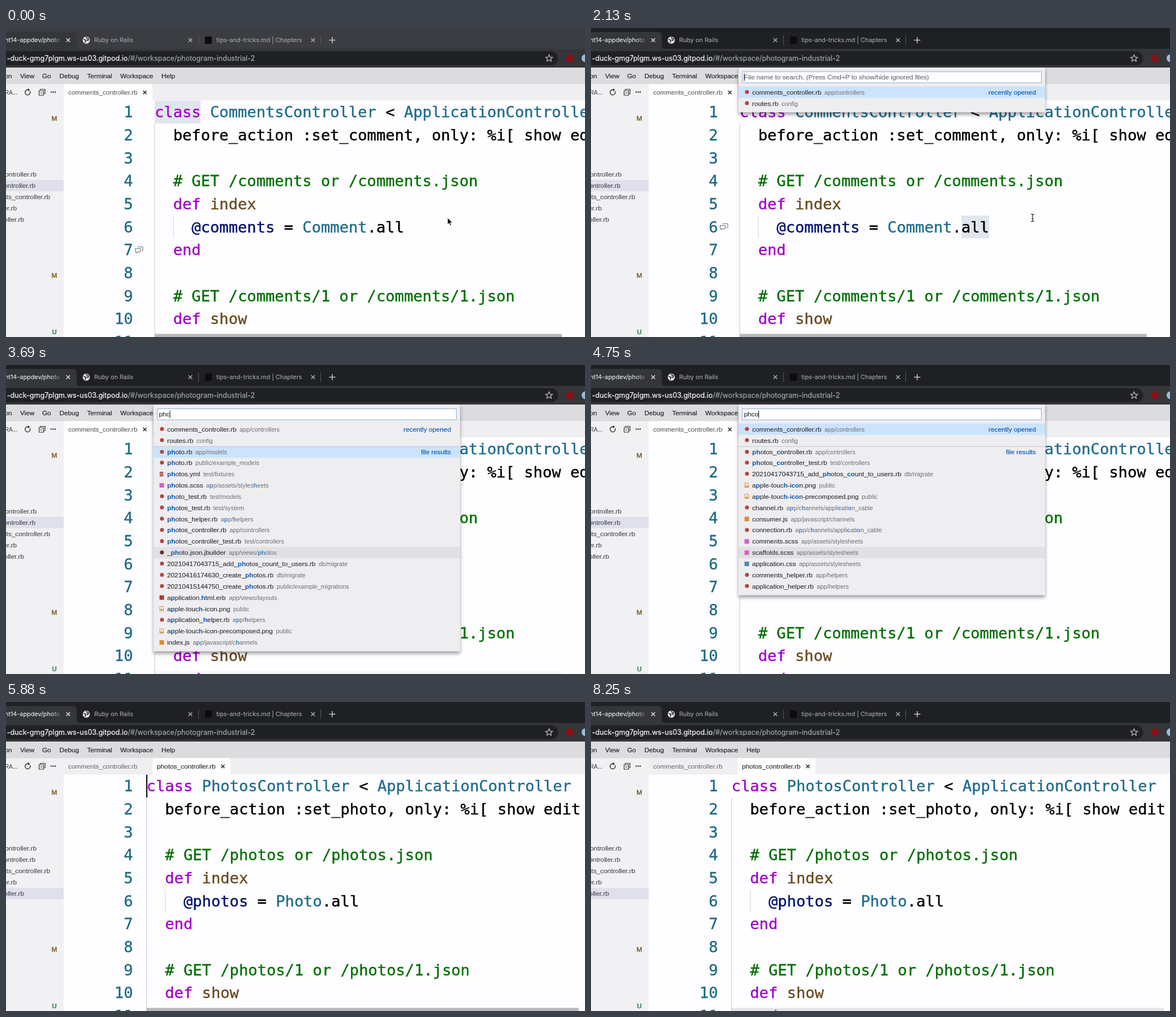
Recreate the animation shown at these times as an HTML page. Size 1024 by 547 pixels, loop 8.31 s.

```html
<!DOCTYPE html>
<html lang="en">
<head>
<meta charset="utf-8">
<title>Quick file open</title>
<style>
html, body { margin: 0; width: 100%; height: 100%; overflow: hidden; background: #fefdff; }
svg { display: block; width: 1024px; height: 547px; }
text { white-space: pre; stroke-width: .15px; }
.ui { font: 11.8px "Liberation Sans", Arial, sans-serif; }
.chrome { font: 10.85px Inter, sans-serif; }
.url { font: 12.55px Inter, sans-serif; stroke-width: .25px; }
.code { font: 27.13px "DejaVu Sans Mono", monospace; stroke-width: .4px; }
.hit { font-weight: bold; fill: #0a55ac; stroke: none; }
.desc { font-size: 10.8px; fill: #6e6e72; stroke: none; }
.desc .hit { fill: #4580c2; }
.pop { filter: drop-shadow(0 4px 3.4px rgba(0, 0, 0, .38)); }
</style>
</head>
<body>
<svg id="stage" viewBox="0 0 1024 547"></svg>
<script>
const LOOP = 8310;
const CLICK = 600, OPEN = 1700, CLOSE = 5350, LOAD = 5700;
const TYPED = [[OPEN, ''], [2720, 'p'], [2930, 'ph'], [3520, 'phc'], [3700, 'phco']];
const DOWN = [4880, 5060];
const LINE = 40.67, ROW = 19.87;
const INK = { k: '#a000cb', c: '#1f6c8c', t: '#000', g: '#007000', f: '#664b20', v: '#001070' };
const stage = document.getElementById('stage');

function el(parent, tag, attrs = {}, content) {
  const node = document.createElementNS('http://www.w3.org/2000/svg', tag);
  for (const key in attrs) node.setAttribute(key, attrs[key]);
  if (content !== undefined) node.textContent = content;
  parent.append(node);
  return node;
}
const group = (parent = stage) => el(parent, 'g');
const rect = (p, x, y, width, height, fill, more) => el(p, 'rect', { x, y, width, height, fill, ...more });
const path = (p, d, stroke, width = 1, more) =>
  el(p, 'path', { d, stroke, 'stroke-width': width, fill: 'none', ...more });
const circle = (p, cx, cy, r, fill) => el(p, 'circle', { cx, cy, r, fill });
const text = (p, x, y, str, fill, cls = 'ui', more) =>
  el(p, 'text', { x, y, fill, stroke: fill, class: cls, ...more }, str);
const END = { 'text-anchor': 'end' };
const cross = (p, x, y, r, color, w) =>
  path(p, `M${x - r} ${y - r}l${2 * r} ${2 * r}m0 ${-2 * r}l${-2 * r} ${2 * r}`, color, w);
const show = (node, on) => node.setAttribute('display', on ? 'inline' : 'none');

// Editor
rect(stage, 0, 0, 1024, 547, '#fefdff');
for (let i = 0; i < 11; i++) text(stage, 224.5, 158.4 + i * LINE, i + 1, '#1f6b85', 'code', END);

function listing(x, name) {
  const g = group(), many = name.toLowerCase() + 's';
  const marks = group(g);
  path(g, `M${x} 169V547`, '#c9c9cd');
  path(g, `M${x + 33} 332V372`, '#d3d3d6');
  [
    `kclass ~c${name}sController~t < ~cApplicationController`,
    `t  before_action :set_${name.toLowerCase()}, only: %i[ show edit update destroy ]`,
    '',
    `g  # GET /${many} or /${many}.json`,
    'k  def ~findex',
    `v    @${many}~t = ~c${name}~t.all`,
    'k  end',
    '',
    `g  # GET /${many}/1 or /${many}/1.json`,
    'k  def ~fshow',
    'k  end'
  ].forEach((line, i) => {
    const row = text(g, x, 158.4 + i * LINE, '', INK.t, 'code');
    if (line) line.split('~').forEach(s => el(row, 'tspan', { fill: INK[s[0]], stroke: INK[s[0]] }, s.slice(1)));
  });
  return { g, marks };
}
const comments = listing(263, 'Comment');
const photos = listing(248.6, 'Photo');
const wordClass = rect(comments.marks, 263, 128.5, 81, 40.5, '#e0e6ef');
const wordAll = rect(comments.marks, 655, 332, 49, 40.5, '#e0e6ef');
const lineCaret = rect(comments.g, 703, 332, 2, 40, '#000');
const fileCaret = rect(photos.g, 248, 128.5, 2, 40.5, '#000');

const bubble = group();
path(bubble, 'M232.5 -5.5h9.5v6.5h-2.5M228.5 -2.5h9v6h-4.5l-2 2.5v-2.5h-2.5z', '#6c6c70', 1, { fill: '#fefdff' });
const slider = rect(stage, 263, 541.5, 720, 5.5, '#b9b9bb');

// Side panel
rect(stage, 0, 99, 102, 448, '#f1f0f3');
const picked = rect(stage, 0, 269, 102, 20, '#e0e0ec');
[['application', 54], ['comments', 52], ['follow_requests', 78], ['likes', 19], ['photos', 32]]
  .forEach(([name, x], i) => text(stage, x, 263 + i * 20, name + '_controller.rb', '#4a4a4e', 'ui', END));
text(stage, 20, 118, 'PHOTOGRA...', '#4e4e52', 'ui', { ...END, style: 'font-size:10px' });
[['M', 164, '#704c10'], ['M', 442, '#704c10'], ['U', 542, '#14702a']]
  .forEach(([s, y, c]) => text(stage, 85.5, y, s, c, 'ui', { 'text-anchor': 'middle', style: 'stroke-width:.35px' }));
path(stage, 'M42.6 112a4.6 4.6 0 1 1-3.2-2.6', '#333', 1.5);
path(stage, 'M38.5 107l4 2.2-3.5 3z', 'none', 0, { fill: '#333' });
path(stage, 'M60.5 110v-1.5h8.5v8h-1.5M58.5 111h8v8h-8zM60.5 115h4', '#333', 1.2);
for (const x of [80, 83.5, 87]) circle(stage, x, 113.5, 1.2, '#333');

// Menu and file tabs
rect(stage, 0, 70, 1024, 29.5, '#dcdbde');
rect(stage, 102, 99.5, 922, 28.5, '#efeef1');
[['Selection', 10.5, END], ['View', 25], ['Go', 64], ['Debug', 94.5], ['Terminal', 143.5], ['Workspace', 202], ['Help', 275]]
  .forEach(([s, x, more]) => text(stage, x, 88.7, s, '#1f1f21', 'ui', { style: 'font-size:11.7px', ...more }));

function fileTab(x, width, name, lit) {
  const g = group();
  rect(g, x, 99.5, width, 29, lit ? '#fefdff' : '#efeef1');
  text(g, x + 8, 118, name, lit || '#747477');
  if (lit) cross(g, x + width - 13.5, 114, 3, '#222', 1.5);
  return g;
}
const before = fileTab(102, 157, 'comments_controller.rb', '#606064');
const after = group();
after.append(fileTab(102, 157, 'comments_controller.rb'), fileTab(259, 138, 'photos_controller.rb', '#2a2a2c'));

// Browser frame
const strip = rect(stage, 0, 0, 1024, 38, '#1f2024');
rect(stage, 0, 37, 1024, 33, '#35363a');
path(stage, 'M0 7H118Q125 7 125 14V31Q125 37 131 37H0Z', 'none', 0, { fill: '#35363a' });
const fade = el(el(stage, 'defs'), 'linearGradient', { id: 'fade', gradientUnits: 'userSpaceOnUse', x1: 78, x2: 98 });
el(fade, 'stop', { offset: 0, 'stop-color': '#e4e5e8' });
el(fade, 'stop', { offset: 1, 'stop-color': '#e4e5e8', 'stop-opacity': 0.1 });
text(stage, -2, 25.2, 'nt14-appdev/photo', 'url(#fade)', 'chrome');
text(stage, 156, 25.2, 'Ruby on Rails', '#a0a3a8', 'chrome');
text(stage, 372, 25.2, 'tips-and-tricks.md | Chapters', '#a0a3a8', 'chrome');
cross(stage, 110, 21.5, 3.3, '#e0e1e4', 1.4);
cross(stage, 326, 21.5, 3.3, '#b0b2b6', 1.4);
cross(stage, 543, 21.5, 3.3, '#b0b2b6', 1.4);
path(stage, 'M571.5 21.5h11M577 16v11', '#c4c6c9', 1.5);
path(stage, 'M340.5 13v17M556.5 13v17', '#55575b');
circle(stage, 142, 21.5, 6.3, '#e6e7e9');
path(stage, 'M137 20l3 1 1 2-1 3M142 16l1 2 3 1-1 3-3-1', '#303135', 1.8);
rect(stage, 352, 15, 12, 13, '#0c0c0e');
path(stage, 'M0 41H964a12.5 12.5 0 0 1 0 25H0Z', 'none', 0, { fill: '#202124' });
text(stage, 215.3, 58, '-duck-gmg7plgm.ws-us03.gitpod.io', '#f0f1f4', 'url', END);
text(stage, 215.6, 58, '/#/workspace/photogram-industrial-2', '#9aa0a6', 'url');
path(stage, 'M960.5 47.5l1.8 4 4.2.4-3.2 2.8 1 4.2-3.8-2.3-3.8 2.3 1-4.2-3.2-2.8 4.2-.4z', '#c6c8cb', 1.2);
circle(stage, 997, 53.5, 6.8, '#8c0f16');
circle(stage, 1025, 53.5, 7, '#9bbbdc');

// Quick open palette: kind|name|folder, brackets mark matched letters
const RECENT = ['r|comments_controller.rb|app/controllers', 'r|routes.rb|config'];
const FOUND_PH = [
  'r|[ph]oto.rb|app/models', 'r|[ph]oto.rb|public/example_models', 'y|[ph]otos.yml|test/fixtures',
  's|[ph]otos.scss|a[p]p/assets/styles[h]eets', 'r|[ph]oto_test.rb|test/models', 'r|[ph]otos_test.rb|test/system',
  'r|[ph]otos_helper.rb|a[p]p/[h]elpers', 'r|[ph]otos_controller.rb|app/controllers',
  'r|[ph]otos_controller_test.rb|test/controllers', 'd|_[ph]oto.json.jbuilder|app/views/[ph]otos',
  'r|20210417043715_add_[ph]otos_count_to_users.rb|db/migrate', 'r|20210416174630_create_[ph]otos.rb|db/migrate',
  'r|20210415144750_create_[ph]otos.rb|public/example_migrations', 'h|a[p]plication.[h]tml.erb|app/views/layouts',
  'i|a[p]ple-touc[h]-icon.png|public', 'r|a[p]plication_[h]elper.rb|a[p]p/[h]elpers',
  'i|a[p]ple-touc[h]-icon-precomposed.png|public', 'j|index.js|a[p]p/javascript/c[h]annels'
];
const FOUND_PHCO = [
  'r|[ph]otos_[co]ntroller.rb|app/controllers', 'r|[ph]otos_[co]ntroller_test.rb|test/controllers',
  'r|20210417043715_add_[ph]otos_[co]unt_to_users.rb|db/migrate', 'i|a[p]ple-touc[h]-i[co]n.png|public',
  'i|a[p]ple-touc[h]-i[co]n-precomposed.png|public', 'r|channel.rb|a[p]p/c[h]annels/appli[c]ati[o]n_cable',
  'j|consumer.js|app/javascript/channels', 'r|connection.rb|a[p]p/c[h]annels/appli[c]ati[o]n_cable',
  's|comments.scss|app/assets/stylesheets', 's|scaffolds.scss|app/assets/stylesheets',
  'c|application.css|app/assets/stylesheets', 'r|comments_helper.rb|app/helpers', 'r|application_helper.rb|app/helpers'
];

function icon(p, kind, y) {
  const square = { h: '#b03a30', c: '#4b89ad', j: '#dd8a2c', s: '#d95fc4' }[kind];
  if (square) rect(p, 271.5, y - 4, 8, 8, square);
  else if (kind === 'i') {
    path(p, `M272 ${y - 4}h6.5v7.5h-6.5z`, '#d99545');
    path(p, `M272.5 ${y + 3}l2-3.5 2 2 1-1 1 2.5z`, 'none', 0, { fill: '#d99545' });
  } else if (kind === 'y') {
    for (const dy of [-4, -1, 2]) rect(p, 271.5, y + dy, 7, 2.2, '#b5453f', { rx: 1 });
  } else circle(p, 275.8, y - 0.5, 3.5, kind === 'd' ? '#6e2c27' : '#b5453f');
}
function marked(p, str) {
  str.split(/[\[\]]/).forEach((s, i) => s && el(p, 'tspan', i % 2 ? { class: 'hit' } : {}, s));
}
const rowTop = i => 103.7 + ROW * i + (i === 2 ? 0.9 : 0);

function palette(found) {
  const g = group(), rows = RECENT.concat(found);
  rect(g, 261, 70, 542, 39.5 + ROW * rows.length, '#eeedf0', { class: 'pop' });
  rect(g, 267.5, 77.5, 529, 19.5, '#fefdff', { stroke: '#94aecf' });
  if (found.length) rect(g, 261, rowTop(11), 542, ROW, '#e1e0e3');
  const sel = rect(g, 261, 0, 542, ROW, '#cbe3fc');
  if (found.length) {
    path(g, 'M261 144.2H803', '#c6c8d2');
    text(g, 787, 158.4, 'file results', '#0a55ac', 'ui', END);
  }
  text(g, 787, 117.6, 'recently opened', '#0a55ac', 'ui', END);
  rows.forEach((row, i) => {
    const [kind, name, folder] = row.split('|'), y = rowTop(i) + ROW / 2;
    icon(g, kind, y);
    const line = text(g, 285, y + 4, '', '#333336');
    marked(line, name);
    marked(el(line, 'tspan', { class: 'desc', dx: 5.5 }), folder);
  });
  return { g, sel };
}
const lists = [[], FOUND_PH, FOUND_PHCO].map(palette);
const input = group();
const hint = text(input, 270.5, 91.3, 'File name to search. (Press Cmd+P to show/hide ignored files)', '#6a6a6d');
const query = text(input, 270.5, 91.3, '', '#2a2a2c');
const inputCaret = rect(input, 0, 80.5, 1, 13.5, '#111');

// Pointers
const arrow = path(stage, 'M781 336v12l2.8-2.5 1.9 4.2 2-.9-1.9-4.1h3.8z', '#fff', 0.8, { fill: '#0a0a0a' });
const beam = path(stage, 'M-3 -6.5Q0 -6.5 0 -5Q0 -6.5 3 -6.5M0 -5V5M-3 6.5Q0 6.5 0 5Q0 6.5 3 6.5M-1.5 1.5h3', '#1c1c1e', 1.2);

const MOVES = [[6300, 781, 336], [6850, 649, 429], [7250, 649, 429], [7600, 628, 560]];
function pointer(t) {
  if (t <= MOVES[0][0]) return MOVES[0].slice(1);
  for (let i = 1; i < MOVES.length; i++) {
    const [t0, x0, y0] = MOVES[i - 1], [t1, x1, y1] = MOVES[i];
    if (t < t1) {
      const u = (t - t0) / (t1 - t0), e = u * u * (3 - 2 * u);
      return [x0 + (x1 - x0) * e, y0 + (y1 - y0) * e];
    }
  }
  return MOVES[MOVES.length - 1].slice(1);
}
const ramp = (t, from, length) => Math.min(1, Math.max(0, (t - from) / length));
const blink = (t, from) => t >= from && (t - from) % 1000 < 500;

function draw(t) {
  const focused = t >= CLICK, open = t >= OPEN && t < CLOSE, loaded = t >= LOAD;
  strip.setAttribute('fill', focused ? '#1f2024' : '#3c3d42');
  show(comments.g, !loaded);
  show(before, !loaded);
  show(photos.g, loaded);
  show(after, loaded);
  show(wordClass, !focused);
  show(wordAll, focused);
  show(lineCaret, t < OPEN && blink(t, CLICK));
  show(fileCaret, blink(t, LOAD));
  picked.setAttribute('y', loaded ? 329 : 269);

  show(bubble, t < TYPED[2][0]);
  bubble.setAttribute('transform', `translate(0 ${focused ? 352 : 393})`);
  slider.setAttribute('x', loaded ? 249 : 263);
  slider.setAttribute('width', loaded ? 764 : 720);
  slider.setAttribute('opacity', 1 - ramp(t, 2980, 800) + ramp(t, CLOSE, 100) - ramp(t, 7750, 800));

  const [since, typed] = TYPED.filter(k => k[0] <= t).pop() || TYPED[0];
  const current = typed.length >> 1;
  const selected = current === 1 ? 2 : current === 2 ? DOWN.filter(d => d <= t).length : 0;
  lists.forEach((list, i) => {
    show(list.g, open && i === current);
    list.sel.setAttribute('y', rowTop(selected));
  });
  show(input, open);
  show(hint, !typed);
  if (query.textContent !== typed) query.textContent = typed;
  show(inputCaret, blink(t, since));
  inputCaret.setAttribute('x', 270.5 + (open && typed ? query.getComputedTextLength() : 0));

  show(arrow, !focused);
  show(beam, focused && t < TYPED[1][0] || t >= MOVES[0][0]);
  beam.setAttribute('transform', `translate(${pointer(t)})`);
}

const start = performance.now();
function tick() {
  draw((performance.now() - start) % LOOP);
  requestAnimationFrame(tick);
}
tick();
</script>
</body>
</html>
```
